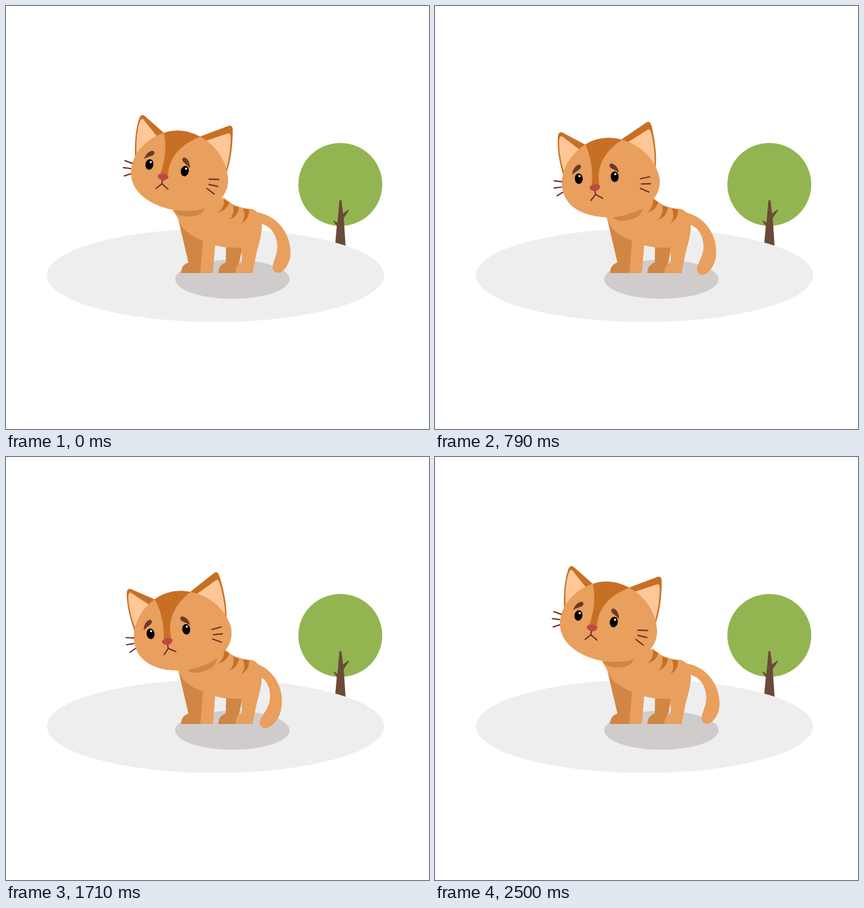
An HTML page that plays this animation: 640 px wide and 640 px high, repeating every 3.57 s.

```html
<!DOCTYPE html>
<html lang="en">
<head>
<meta charset="utf-8">
<title>Sad kitten</title>
<style>
  html, body { margin: 0; width: 100%; height: 100%; overflow: hidden; background: #fff; }
  svg { display: block; width: 100%; height: 100%; }
  .fur { fill: #e99f5d; }
  .shade { fill: #d08644; }
  .dark { fill: #c77025; }
  .ear { fill: #ffc797; }
  .brown { fill: #6b3a28; }
  .line { fill: none; stroke: #6b3025; stroke-width: 1.9; stroke-linecap: round; stroke-linejoin: round; }
</style>
</head>
<body>
<svg viewBox="0 0 640 640">
  <defs>
    <path id="stripe" d="M-4.500 -1.300Q-1 11 -10 20Q3 15 4.500 1.300Z"/>
    <g id="eye">
      <ellipse rx="6" ry="8" transform="rotate(10)"/>
      <circle cx="2" cy="-3.500" r="1.600" fill="#fff"/>
    </g>
    <path id="brow" d="M-7 6.500C-5 -1 1 -6 6 -6C10 -5 9 -1 6 1C1 3 -3 4 -7 6.500Z"/>
  </defs>

  <!-- scenery -->
  <ellipse cx="505.800" cy="270" rx="63.500" ry="62.800" fill="#92b551"/>
  <path fill="#6b4a37" d="M504.500 294Q506 293 507.500 294L510 314L518 308L519 309L511 321L514 366H497.500L500.500 333L495 325L496 324.500L501.500 328Z"/>
  <ellipse cx="317" cy="407.500" rx="255" ry="70.500" fill="#eee"/>
  <ellipse cx="342.500" cy="413.500" rx="86.500" ry="29.500" fill="#d0cccc"/>

  <path id="tail" class="fur" d="M376 312C406 313.500 431 341 430.500 374C430 390 420 404 411 404C404 403 402 396 404.500 389C408 378 412 370 410 358C407 340 396 331 384 329Z"/>

  <!-- body -->
  <path class="shade" d="M260 320L300 350L296 404H265C265 396 268 391 276 388Z"/>
  <path class="shade" d="M333 362H357Q356 378 352 390L350 404H321Q322 391 332.500 388Z"/>
  <path class="fur" d="M252 308L330 290C340 300 352 306 372 307C381 310 387 319 387 330C388 345 381 365 379 374L373 404H347Q347 391 357 388L356 365.500Q335 367 316.500 362L313 404H294L298 355Q267 344 260.500 322Z"/>
  <g class="dark">
    <use href="#stripe" transform="translate(334 294.500) rotate(10)"/>
    <use href="#stripe" transform="translate(348 303.300)"/>
    <use href="#stripe" transform="translate(363 307) rotate(-10)"/>
  </g>

  <g id="head">
    <path class="shade" d="M254 309C256 315 264 318.500 278 318.500C291 318 297 314 301 306Z"/>
    <path class="dark" d="M195.500 232C194 210 196 185 202 169C204 164.500 207 164 210 166.500L240 193L230 215Z"/>
    <path class="ear" d="M198 230C196 205 199 183 203 174C205 170 207 170 209 173L229 198L225 215Z"/>
    <path class="dark" d="M291 198.500L337 181.300C342 180 343 184 343 189C343 210 340 235 334 251L310 230Z"/>
    <path class="ear" d="M302 204L335 193C339 191 340 195 340 199C340 215 337 235 333 248L310 230Z"/>
    <path class="fur" d="M259 188.500C280 188.500 301 199 316 215C331 232 336 250 336 266C335 289 314 310 273 310C231 310 188 287 189 251C190 217 225 189 259 188.500Z"/>
    <path class="dark" d="M239 192C243 210 241 235 233 255H245C247 230 262 210 294 198C283 191.500 271 188.500 259 188.500Q248 188.500 239 192Z"/>

    <g class="brown">
      <use href="#brow" transform="translate(216 225)"/>
      <use href="#brow" transform="translate(274 237) rotate(21) scale(-1 1)"/>
    </g>
    <use href="#eye" x="217" y="239.700"/>
    <use href="#eye" x="270.500" y="249.700"/>
    <path fill="#bf4847" d="M229.800 256C233 252.500 242 252.500 246 257.500Q245 264 237 264Q229 262 229.800 256Z"/>
    <path class="line" d="M236.500 264L235.800 269L227 276M235.800 269L245 277"/>
    <path class="line" d="M180 234L191 238M177.500 244.500L188.500 246M179 257L188.500 254M307.300 262L321.800 262.500M307 270L320.500 273M304 276L315 284.500"/>
  </g>
</svg>
<script>
  const LOOP = 3570, LAST = 35;   // 14 steps per second, then a rest
  const head = document.getElementById('head');
  const tail = document.getElementById('tail');

  // Gentle ease in and out, half linear and half sine.
  function ease(u) {
    u = Math.min(1, Math.max(0, u));
    return (u + (1 - Math.cos(Math.PI * u)) / 2) / 2;
  }

  // Rises to 1 between steps a and b, falls back to 0 from c to the last step.
  const pulse = (s, a, b, c) => ease((s - a) / (b - a)) - ease((s - c) / (LAST - c));

  function draw() {
    const t = Math.floor(performance.now() % LOOP / 10) * 10;
    const step = Math.min(LAST, Math.floor((t + 5) * .014));
    const nod = pulse(step, 0, 15.2, 24), swing = pulse(step, 4.5, 22, 22);
    head.setAttribute('transform', `translate(${1.2 * nod} ${.3 * nod}) rotate(${-17.8 * nod} 305 252)`);
    tail.setAttribute('transform', `rotate(${15.5 * swing} 376 318)`);
    requestAnimationFrame(draw);
  }
  draw();
</script>
</body>
</html>
```
